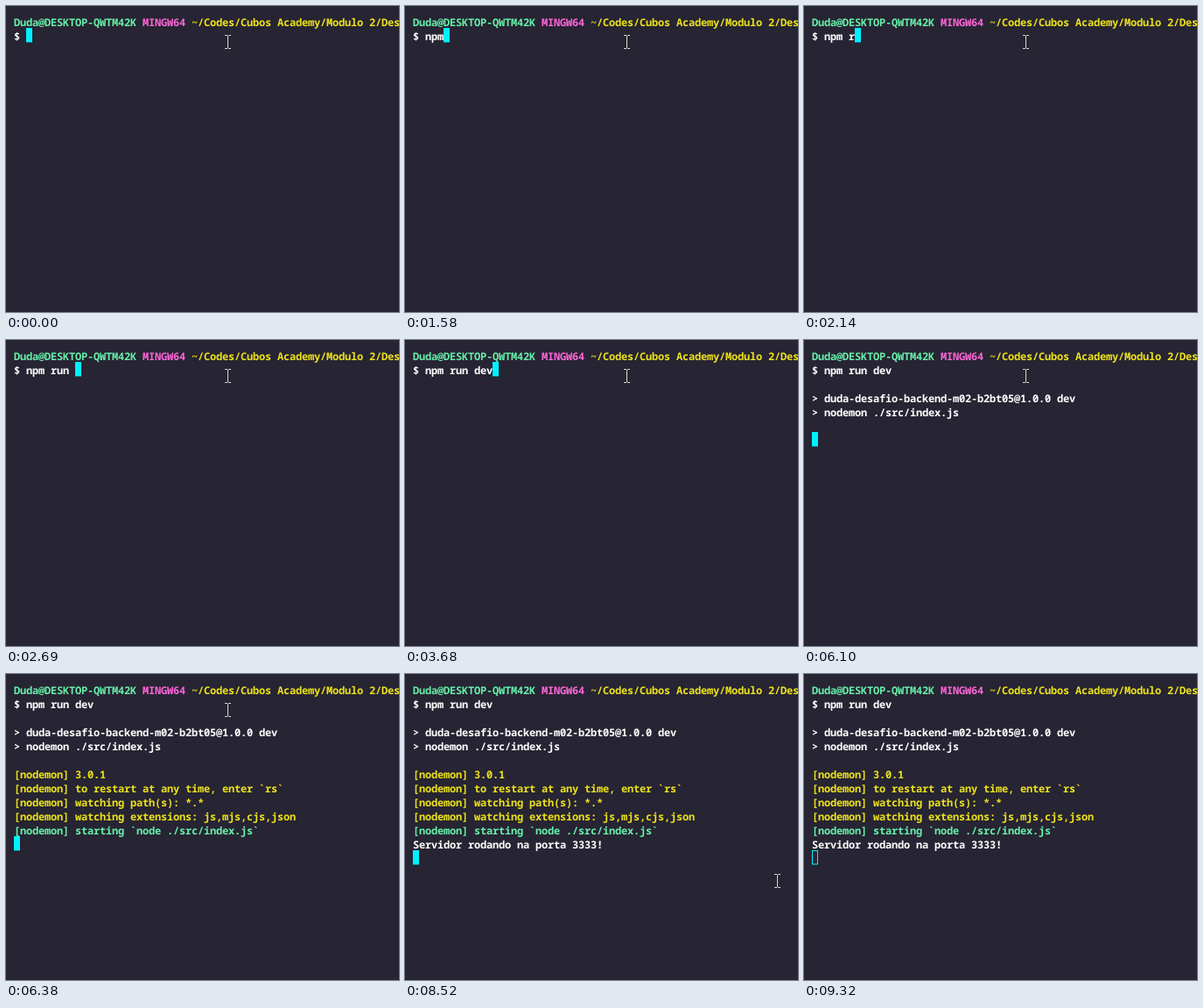
Write an HTML page that moves like this. It is 449 px wide and 349 px high and loops after 9340 ms.

```html
<!DOCTYPE html>
<html lang="pt">
<head>
<meta charset="utf-8">
<title>Terminal</title>
<style>
  html, body { margin: 0; width: 100%; height: 100%; overflow: hidden; background: #272433; }
  svg { display: block; }
  text {
    font: 700 12px "Noto Sans Mono", "DejaVu Sans Mono", monospace;
    letter-spacing: -0.2px; text-rendering: geometricPrecision;
    white-space: pre; fill: #fff;
  }
  .green { fill: #67f0aa; }
  .pink { fill: #ff66d9; }
  .yellow { fill: #ede31c; }
  #caret { fill: #00f0ff; }
  #caret.hollow { fill: none; stroke: #00f0ff; }
  #mouse { fill: none; stroke: #d8dbcc; }
</style>
</head>
<body>
<svg width="449" height="349" viewBox="0 0 449 349">
  <g id="screen"></g>
  <rect id="caret"></rect>
  <path id="mouse" d="M-3.5 -7.5h3m1 0h3M0 -7v14M-3.5 7.5h3m1 0h3"></path>
</svg>
<script>
const LOOP = 9340, LEFT = 9, TOP = 9, CELL = 7, ROW = 16, CARET_HEIGHT = 16.4;
const COMMAND = "npm run dev";
const KEY_TIMES = [1000, 1150, 1580, 1860, 2140, 2260, 2560, 2690, 2840, 2960, 3680];
const ENTER = 4390, BLUR = 9320;

// Time of each output block and the caret row after it
const CARET_ROWS = [[ENTER, 2], [6100, 6], [6380, 11], [6660, 12]];

// Pointer positions: time, x, y (centre)
const POINTER = [[0, 253.5, 41], [8520, 425.5, 236], [8650, 422.5, 317],
                 [8800, 411.5, 331], [8930, 403.5, 344], [9050, 403.5, 370]];

const LINES = [
  [0, 0, ["green", "Duda@DESKTOP-QWTM42K "], ["pink", "MINGW64 "],
         ["yellow", "~/Codes/Cubos Academy/Modulo 2/Desafio"]],
  [1, 0, ["", "$ "], ["", ""]],
  [3, 6100, ["", "> duda-desafio-backend-m02-b2bt05@1.0.0 dev"]],
  [4, 6100, ["", "> nodemon ./src/index.js"]],
  [6, 6380, ["yellow", "[nodemon] 3.0.1"]],
  [7, 6380, ["yellow", "[nodemon] to restart at any time, enter `rs`"]],
  [8, 6380, ["yellow", "[nodemon] watching path(s): *.*"]],
  [9, 6380, ["yellow", "[nodemon] watching extensions: js,mjs,cjs,json"]],
  [10, 6380, ["green", "[nodemon] starting `node ./src/index.js`"]],
  [11, 6660, ["", "Servidor rodando na porta 3333!"]]
];

const screen = document.getElementById("screen");
const caret = document.getElementById("caret");
const mouse = document.getElementById("mouse");

function setAttributes(node, attributes) {
  for (const name in attributes) node.setAttribute(name, attributes[name]);
}

function addText(row, column, color, content) {
  const node = document.createElementNS("http://www.w3.org/2000/svg", "text");
  setAttributes(node, { x: LEFT + column * CELL, y: TOP + row * ROW + 14, class: color });
  node.textContent = content;
  screen.append(node);
  return node;
}

const lines = LINES.map(([row, time, ...parts]) => {
  let column = 0;
  const nodes = parts.map(([color, content]) => {
    const node = addText(row, column, color, content);
    column += content.length;
    return node;
  });
  return { time, nodes };
});
const typed = lines[1].nodes[1];

const latest = (steps, t) => steps.filter(([time]) => time <= t).pop();

function draw(t) {
  const count = KEY_TIMES.filter(time => time <= t).length;
  typed.textContent = COMMAND.slice(0, count);
  for (const { time, nodes } of lines)
    for (const node of nodes) node.style.display = t >= time ? "" : "none";

  const column = t < ENTER ? 2 + count : 0;
  const row = t < ENTER ? 1 : latest(CARET_ROWS, t)[1];
  const hollow = t >= BLUR;
  const inset = hollow ? 0.5 : 0;
  caret.setAttribute("class", hollow ? "hollow" : "");
  setAttributes(caret, {
    x: LEFT + column * CELL + inset, y: TOP + row * ROW + inset,
    width: CELL - 2 * inset, height: CARET_HEIGHT - 2 * inset
  });

  const [, x, y] = latest(POINTER, t);
  mouse.setAttribute("transform", `translate(${x} ${y})`);
}

const start = performance.now();
function tick() {
  draw((performance.now() - start) % LOOP);
  requestAnimationFrame(tick);
}
tick();
</script>
</body>
</html>
```
